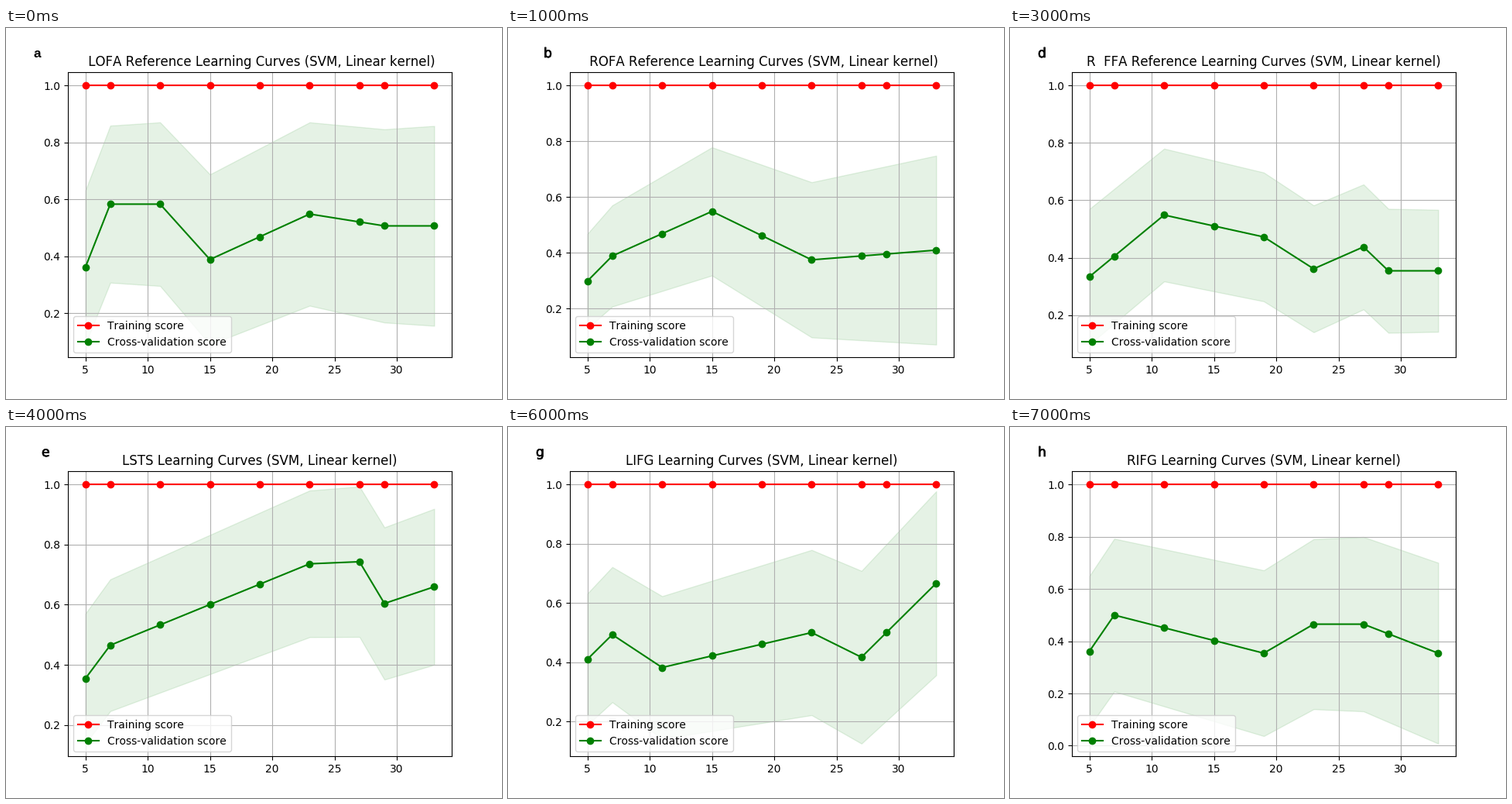
A matplotlib script that plays this animation: 641x479 px, repeating every 8000 ms.

```python
import matplotlib.pyplot as plt
import numpy as np
from matplotlib.animation import FuncAnimation
from matplotlib.patheffects import withStroke
from matplotlib.ticker import MultipleLocator

plt.rcParams["text.kerning_factor"] = 6  # classic, looser letter spacing

W, H, DPI = 641, 479, 100
LEFT, RIGHT, TOP, BOTTOM = 80, 576, 57.5, 425.5
SIZES = np.array([5, 7, 11, 15, 19, 23, 27, 29, 33])
FOLDS = 144  # scores are whole counts out of this

# region, turning points {size: count}, lowest edge of the band, its widening
PANELS = [
    (" LOFA Reference", {5: 52, 7: 84, 11: 84, 15: 56, 23: 79, 29: 73}, 0.09, 0.3),
    (" ROFA Reference", {5: 43, 7: 56, 15: 79, 23: 54, 33: 59}, 0.071, 1.0),
    ("L FFA Reference", {5: 52, 15: 70, 33: 62}, 0.14, 0.1),
    ("R  FFA Reference", {5: 48, 11: 79, 19: 68, 23: 52, 27: 63, 29: 51}, 0.097, -0.1),
    ("LSTS", {5: 51, 7: 67, 23: 106, 27: 107, 29: 87, 33: 95}, 0.138, 0.2),
    ("RSTS", {5: 55, 23: 84, 33: 83}, 0.15, 0.1),
    ("LIFG", {5: 59, 7: 71, 11: 55, 23: 72, 27: 60, 33: 96}, 0.125, 0.4),
    ("RIFG", {5: 52, 7: 72, 19: 51, 23: 67, 27: 67, 33: 51}, 0.008, 0.2),
]

# the tiny extra keeps the pixel height from rounding down
fig = plt.figure(figsize=(W / DPI, (H + 1e-6) / DPI), dpi=DPI, facecolor="white")
ax = fig.add_axes([LEFT / W, 1 - BOTTOM / H, (RIGHT - LEFT) / W, (BOTTOM - TOP) / H])
letter = fig.text(0, 1 - 38 / H, "", size=12.4, va="baseline", ha="left")


def padded(lo, hi):
    pad = 0.05 * (hi - lo)
    return lo - pad, hi + pad


def curve(points, low, widening):
    """Mean score and a band half-width that just reaches down to low."""
    mean = np.interp(SIZES, list(points), list(points.values())) / FOLDS
    shape = 1 + widening * (SIZES - SIZES[0]) / np.ptp(SIZES)
    return mean, shape * ((mean - low) / shape).min()


def draw(i):
    region, points, low, widening = PANELS[i]
    mean, dev = curve(points, low, widening)

    ax.clear()
    ax.set_title(f"{region} Learning Curves (SVM, Linear kernel)")
    ax.grid(True)
    ax.fill_between(SIZES, mean - dev, mean + dev, color="g", alpha=0.1)
    ax.plot(SIZES, np.ones(len(SIZES)), "o-", color="r", label="Training score")
    ax.plot(SIZES, mean, "o-", color="g", label="Cross-validation score")
    ax.set_xlim(padded(SIZES[0], SIZES[-1]))
    ax.set_ylim(padded(low, 1))
    ax.xaxis.set_major_locator(MultipleLocator(5))
    ax.yaxis.set_major_locator(MultipleLocator(0.2))
    ax.legend(loc="lower left")

    name = "abcdefgh"[i]
    first = i == 0
    letter.set_text(name)
    letter.set_x((46 if name in "bcef" else 36) / W)
    letter.set_family("Liberation Sans" if first else "DejaVu Sans")
    letter.set_weight("bold" if first else "normal")
    letter.set_path_effects([] if first else [withStroke(linewidth=0.5, foreground="black")])
    return []


anim = FuncAnimation(fig, draw, frames=len(PANELS), init_func=lambda: draw(0),
                     interval=1000, repeat=True, repeat_delay=0, blit=False)
plt.show()
```
